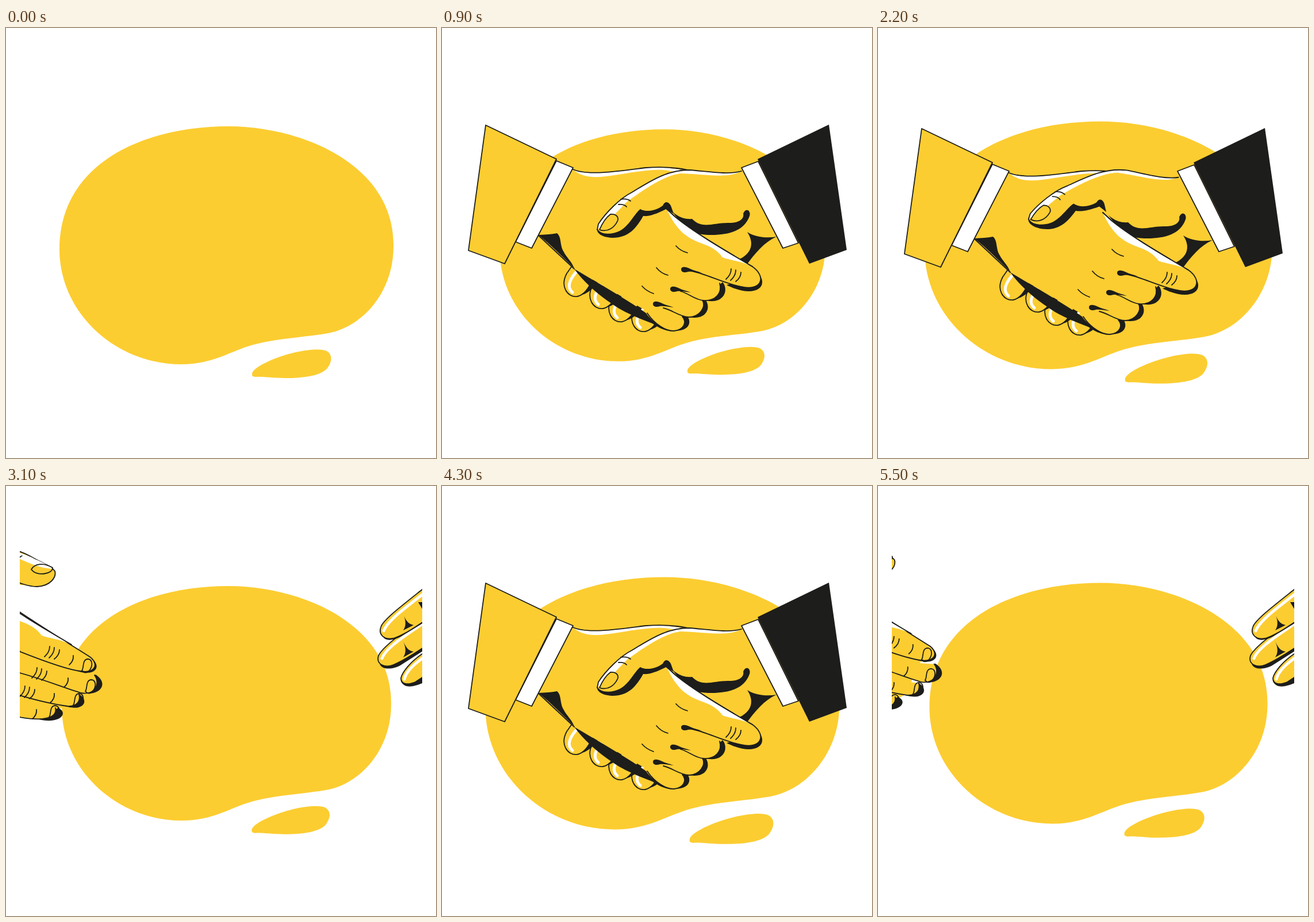
An HTML page that plays this animation: 748x748 px, repeating every 5.6 s.

```html
<!DOCTYPE html>
<html lang="en">
<head>
<meta charset="utf-8">
<title>Handshake</title>
<style>
html, body { margin: 0; width: 100%; height: 100%; overflow: hidden; background: #fff }
svg { display: block; width: 100vw; height: 100vh }
path { stroke-linejoin: round; stroke-linecap: round; stroke-width: 1.8 }
.fill { fill: #fccd31 }
.skin { fill: #fccd31; stroke: #1d1d1b }
.ink { fill: #1d1d1b }
.white { fill: #fff }
.cuff { fill: #fff; stroke: #1d1d1b }
.line { fill: none; stroke: #1d1d1b }
.shine { fill: none; stroke: #fff; stroke-width: 5 }
</style>
</head>
<body>
<svg id="stage" viewBox="0 0 748 748"></svg>
<script>
const path = (cls, d) => `<path class="${cls}" d="${d}"/>`;
const group = (id, ...parts) => `<g id="${id}">${parts.join('')}</g>`;
const at = (x, y, art) => `<g transform="translate(${x} ${y})">${art}</g>`;
const drop = (x, y) => path('ink', `M${x} ${y}c0-6 9-5 16-1c6 3 12 4 20 7c-10-1-18-3-24-2c-6 2-12 1-12-4`);
const knuckle = (x, y) => path('line', `M${x} ${y}q9-8 9-18m-1 20q9-8 9-18m0 20q9-7 9-16`);
const tick = (x, y) => path('line', `M${x} ${y}q8-7 7-16`);
const nail = (x, y) => path('line', `M${x} ${y}c4-4 0-19 10-20c8 0 9 10 5 17c-4 7-10 9-15 3`);

const blob = group('blob',
  path('fill', 'M387 171C515 171 676 238 674 380C674 460 620 520 560 531C520 538 470 540 430 551C390 562 360 585 305 585C190 585 93 495 93 385C93 235 240 171 387 171z'),
  path('fill', 'M428 602C428 590 470 572 500 565C525 559 548 557 558 562C568 568 568 580 558 593C545 606 515 609 485 609C465 609 445 606 434 607C428 606 428 605 428 602z'));

// Details that both poses share
const leftArm =
  path('white', 'M83 203C110 216 170 205 210 200C255 197 300 208 330 222C300 215 280 209 255 206C225 200 190 208 155 213C125 218 100 219 83 203z') +
  path('line', 'M83 203C110 215 170 205 210 200C255 197 280 203 300 208') +
  path('ink', 'M23 317C35 316 45 316 55 314C63 320 60 335 66 345C72 357 80 362 85 375C65 355 45 335 23 317z') +
  path('white', 'M246 272L260 285C290 310 340 340 395 372C375 362 355 361 343 356C335 345 325 338 305 331C280 322 262 308 246 272z') +
  path('line', 'M246 272L260 285C290 310 340 340 395 372') +
  path('line', 'M262 336q8 9 20 12M228 374q8 10 20 13M203 406q8 9 20 13') +
  drop(271, 377) + drop(252, 411) + drop(222, 437) +
  path('cuff', 'M54 188L83 200L11 340L-17 329z') +
  path('skin', 'M-69 126L54 185L-36 367L-99 344z');
const rightArm =
  path('cuff', 'M603 208L632 197L702 339L675 348z') +
  path('ink', 'M631 193L755 133L786 351L721 375z');
const bean = path('ink', 'M468 266C482 288 498 299 517 297C535 316 555 303 582 304C600 304 608 296 606 288C610 277 620 282 617 292C608 318 580 326 545 325C510 324 482 305 468 266z');

const openFingers = at(-355, 172,
  path('ink', 'M785 212L785 252L724 292C705 305 684 328 687 340C694 354 712 348 724 343L800 300z') +
  path('skin', 'M790 246L724 292C705 305 690 322 687 334C687 346 700 346 712 341L790 290z') +
  path('shine', 'M724 300C705 314 696 324 693 336') +
  path('ink', 'M650 300C645 322 672 320 686 312L780 252L780 240z') +
  path('skin', 'M780 190L724 232C695 250 655 280 648 295C643 311 660 317 674 311C700 300 730 278 780 245z') +
  path('shine', 'M724 240C695 260 660 282 654 300') +
  path('ink', 'M655 258C656 272 676 269 690 260L780 205L780 190z') +
  path('skin', 'M780 130L724 180C690 207 660 230 653 243C646 259 658 268 674 265C700 257 740 225 780 200z') +
  path('shine', 'M724 189C690 215 664 235 657 252') +
  path('ink', 'M691 223C697 238 702 240 709 242L691 251C697 242 695 232 691 223zM691 270C697 284 702 287 709 288L691 298C697 289 695 280 691 270zM717 202L726 217L726 202z'));

const openPalm =
  path('fill', 'M605 214L510 213L405 228L380 275L365 355L410 400L480 440L550 420L663 328z') +
  path('ink', 'M388 342C400 372 425 382 445 380C465 378 475 370 487 366C480 385 468 400 468 412C480 433 528 430 548 404C550 392 540 385 537 378C560 365 590 372 606 352C614 340 618 330 613 320C625 330 645 332 663 328C620 355 590 385 560 415C530 445 500 480 470 510C450 530 430 540 414 535L446 468L352 520L338 519L390 480L420 430L405 385z') +
  path('skin', 'M470 440C445 465 415 495 404 515C398 532 412 538 422 528C433 515 439 505 445 497C457 502 468 495 466 481C480 480 490 470 486 455C484 448 480 443 470 440z') +
  path('line', 'M445 497L432 491M466 481L458 472') +
  path('ink', 'M478 268C460 298 430 315 415 328C402 340 400 350 404 364L388 342C405 322 440 298 460 275z') +
  path('line', 'M460 275L366 355M447 305C455 330 480 347 505 352') + bean + rightArm;

const openLeft =
  path('fill', 'M83 203C110 215 170 205 210 200C255 197 300 208 350 233L367 250L345 270L305 268L233 258L260 285C290 310 340 340 428 394L400 440L390 475L345 500C250 490 150 440 85 375L23 317L11 340z') +
  path('ink', 'M335 501C372 512 392 492 372 482z') +
  path('skin', 'M85 375C130 425 190 465 260 487C290 496 320 503 345 501C363 499 369 492 367 482') +
  path('ink', 'M85 375C150 431 200 457 275 491C220 484 150 441 85 375z') +
  path('ink', 'M375 476C415 492 428 470 408 458z') +
  path('skin', 'M245 441C300 460 350 474 388 479C405 480 411 470 408 458') +
  path('ink', 'M400 452C440 468 464 442 437 424z') +
  path('skin', 'M280 415C330 425 380 447 412 456C435 460 446 440 435 425') +
  path('ink', 'M400 416C432 430 452 412 428 394z') +
  path('skin', 'M300 382C340 398 385 415 410 418C434 422 444 408 428 394C400 376 340 340 260 285L233 258') +
  path('skin', 'M233 258C260 256 275 257 287 256C300 264 320 271 335 271C358 270 369 255 366 244C360 236 345 230 330 222C318 215 308 210 295 207') +
  path('white', 'M300 211C325 220 350 230 363 240C340 240 318 228 300 221z') +
  path('line', 'M325 241C330 232 345 228 362 238C364 248 335 255 325 241M293 225q4-8 12-12M299 228q4-8 12-12') +
  knuckle(348, 393) + knuckle(326, 430) + knuckle(305, 462) + knuckle(276, 489) +
  tick(391, 407) + tick(382, 446) + tick(358, 473) + tick(327, 501) +
  nail(413, 417) + nail(419, 453) + nail(398, 477) + nail(356, 498) + leftArm;

const openThumb =
  path('fill', 'M605 214C580 225 545 216 510 213C470 211 430 215 405 228C385 240 360 250 346 262C338 282 365 292 385 285C400 280 412 272 424 262L468 270L610 250z') +
  path('white', 'M605 214C580 225 545 216 510 213C470 211 430 215 405 228C385 240 360 250 346 262L345 269C362 258 385 248 408 236C435 222 470 217 505 218C545 222 575 227 605 214z') +
  path('line', 'M605 214C580 225 545 216 510 213C470 211 430 215 405 228C385 240 360 250 346 262L343 270M346 271C352 257 370 247 382 258C384 270 363 279 346 271M394 232q9 2 10 11M402 229q9 3 11 12') +
  path('ink', 'M343 268C347 283 370 290 390 283C405 278 415 270 424 261C432 272 455 265 478 265C460 276 445 280 430 274C415 290 400 294 380 293C358 292 341 283 343 268z');

const grip = (x, y) => at(x, y,
  path('ink', 'M18-40L20 19C42 18 54 2 62-12z') +
  path('skin', 'M18-40L4-20C-8 2 5 22 22 20C37 17 44 0 54-16') +
  path('shine', 'M20-22C8-8 4 5 14 13'));

const shakeBack =
  path('fill', 'M521 243L582 357L527 408L400 330L430 241z') +
  path('ink', 'M582 357C560 367 545 385 527 410L508 400C538 390 545 370 531 349C545 358 565 360 582 357z') +
  at(-82, 29, bean + rightArm) + grip(331, 502) + grip(291, 485) + grip(258, 462) + grip(213, 441);

const shakeLeft =
  path('fill', 'M228 242C255 253 300 243 345 238C380 236 410 239 440 246L400 312C425 352 470 372 515 398L540 445L486 440L455 470L430 495L400 520L362 490L230 413L168 355L156 377z') +
  path('ink', 'M230 413C270 437 320 465 355 490C365 506 384 514 400 522C386 520 376 515 366 508C345 500 325 492 308 482C280 464 252 443 230 413z') +
  path('line', 'M345 238C375 236 410 239 440 246M168 355L230 413') +
  path('ink', 'M385 517C430 530 438 505 424 492z') +
  path('skin', 'M357 490C370 510 390 521 403 521C422 519 426 505 418 496') +
  path('ink', 'M425 496C460 505 470 480 457 465z') +
  path('skin', 'M385 481C400 484 412 496 430 497C448 496 460 480 453 467') +
  path('ink', 'M455 467C490 477 500 450 488 436z') +
  path('skin', 'M415 452C430 456 440 467 455 468C476 469 488 455 483 438') +
  path('ink', 'M495 441C540 464 568 447 553 424z') +
  path('skin', 'M435 417C460 422 490 438 520 444C555 452 566 428 540 409C485 377 435 347 405 322L391 309') +
  knuckle(494, 431) + at(145, 37, leftArm);

const shakeThumb =
  path('fill', 'M521 243C495 250 460 243 430 241C390 241 360 262 330 280C310 290 285 315 272 335C267 350 285 356 305 350C325 343 335 325 346 314L392 302L400 312L521 290z') +
  path('white', 'M521 243C495 250 460 243 430 241C390 241 360 262 330 280C310 290 285 315 272 335L271 344C290 330 308 310 322 296C350 276 385 251 415 247C460 248 495 257 521 243z') +
  path('line', 'M521 243C495 250 460 243 430 241C390 241 360 262 330 280C310 290 285 315 272 335L270 345M307 301q10-1 14 4M311 292q10-2 17 3') +
  path('skin', 'M274 345C279 333 285 324 293 318C301 317 307 321 306 328C301 341 288 350 274 345z') +
  path('ink', 'M270 342C274 354 295 354 309 347C326 338 334 318 345 309C355 315 372 312 384 303C388 294 394 296 398 303L403 317L390 309C372 318 360 322 350 321C338 342 325 359 296 359C278 358 268 351 270 342z');

const stage = document.getElementById('stage');
stage.innerHTML = '<clipPath id="frame"><path d="M24 24H724V724H24z"/></clipPath><g clip-path="url(#frame)">' + blob +
  group('open', group('fingers', openFingers), group('palm', openPalm), group('left', openLeft), group('thumb', openThumb)) +
  group('shake', shakeBack, shakeLeft, group('grasp', shakeThumb)) + '</g>';

const el = id => document.getElementById(id);
const move = (id, x, y) => el(id).setAttribute('transform', `translate(${x} ${y})`);
const show = (id, on) => el(id).style.display = on ? '' : 'none';

const pulse = [[0, 1], [1, 1], [3, .986], [5, .972], [7, .968], [9, .975], [13, 1.036], [14, 1.053], [15, 1.06],
  [17, 1.087], [19, 1.069], [22, 1.041], [25, 1.026], [27, 1.012], [28, 1]];
// Step: left hand travel, right hand distance
const reach = { 2: [-.7, 1.7], 3: [0, 1], 4: [.6, .4], 5: [1, 0], 6: [1.3, -.16],
  23: [1.45, -.2], 24: [1.28, -.1], 25: [1, 0], 26: [.5, .4], 27: [-.2, 1] };

function mix(points, x) {
  const i = points.findIndex(p => p[0] >= x);
  if (i < 1) return points[0][1];
  const [a, b] = [points[i - 1], points[i]];
  return a[1] + (b[1] - a[1]) * (x - a[0]) / (b[0] - a[0]);
}

function draw(now) {
  const step = Math.floor(now % 5600 / 100) % 28;
  const size = mix(pulse, step);
  el('blob').setAttribute('transform', `translate(384 378) scale(${size}) translate(-384 -378)`);
  const pose = reach[step], shaking = step > 6 && step < 23;
  show('open', pose);
  show('shake', shaking);
  if (pose) {
    const [u, r] = pose;
    const far = 355 * r + 50 * Math.max(0, r);
    move('left', 281 * (u - 1), 96 * (u - 1));
    move('fingers', 355 * r, -172 * r);
    move('palm', far, -172 * r);
    move('thumb', far, -172 * r);
  }
  if (shaking) {
    const swing = step < 22 ? Math.sin((step - 6.5) * Math.PI / 3) : 0;
    move('shake', 0, 12 - 12 * swing);
    // The thumb lifts just before the hands part
    el('grasp').setAttribute('transform', `rotate(${step < 22 ? 0 : 6.5} 480 260)`);
  }
  requestAnimationFrame(draw);
}
requestAnimationFrame(draw);
</script>
</body>
</html>
```
